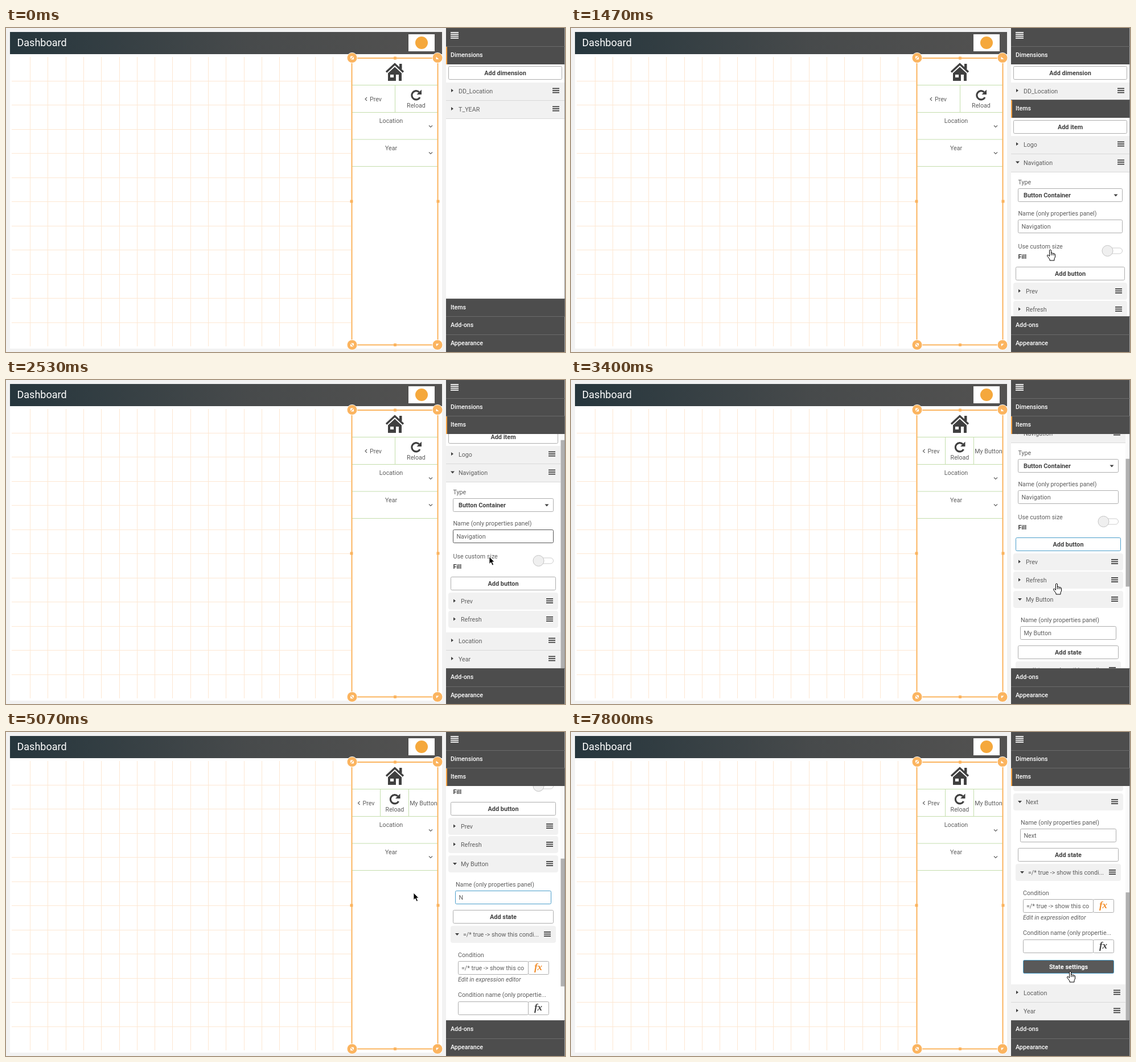
Recreate the animation shown at these times as an HTML page. Size 982x570 px, loop 8000 ms.

```html
<!DOCTYPE html>
<html lang="en">
<head>
<meta charset="utf-8">
<title>Dashboard</title>
<style>
  html, body { margin: 0; width: 100%; height: 100%; overflow: hidden; background: #f2f2f2; }
  svg { display: block; }
  text { font: 10.7px Roboto, sans-serif; white-space: pre; }
  .medium { font-weight: 500; }
  .bold { font-size: 10.9px; font-weight: 700; }
  .italic { font-style: italic; }
  .title { font-size: 18px; }
  .fx { font: italic 700 17px "Liberation Serif", serif; }
  .mid { text-anchor: middle; }
</style>
</head>
<body>
<svg id="stage" width="982" height="570" viewBox="0 0 982 570">
  <defs>
    <linearGradient id="bar">
      <stop stop-color="#26363d"/><stop offset=".55" stop-color="#474a4b"/><stop offset="1" stop-color="#535251"/>
    </linearGradient>
  </defs>
  <g id="sheet"></g>
  <g id="live"></g>
</svg>
<script>
const LOOP = 8000;
const DARK = '#4d4d4d', INK = '#404040', GREY = '#5e5e5e', LINE = '#adadad', ROW = '#f1f1f1';
const ORANGE = '#fbb45f', BLUE = '#4a9ecb', GREEN = '#c4deac';

// Drawing helpers
const rect = (x, y, w, h, fill, more = '') => `<rect x="${x}" y="${y}" width="${w}" height="${h}" fill="${fill}" ${more}/>`;
const path = (d, fill, more = '') => `<path d="${d}" fill="${fill}" ${more}/>`;
const stroke = (d, color, width = 1) => path(d, 'none', `stroke="${color}" stroke-width="${width}"`);
const text = (x, y, s, cls = '', fill = GREY) =>
  `<text x="${x}" y="${y + 3.8}" class="${cls}" fill="${fill}">${s.replace('>', '&gt;')}</text>`;
const field = (x, y, right, border = LINE, fill = '#fff') =>
  rect(x, y, right - x, 23, fill, `stroke="${border}" rx="2"`);
const button = (x, y, right, label, border, fill, ink = INK) =>
  field(x, y, right, border, fill) + text((x + right) / 2, y + 11.5, label, 'bold mid', ink);
const bars = (x, y, w, count, gap, color) =>
  Array.from({ length: count }, (_, i) => rect(x, y + i * gap, w, 1.8, color)).join('');
const fixed = (x, y, w, h, scroll, content) =>
  `<svg x="${x}" y="${y}" width="${w}" height="${h}" viewBox="${x} ${scroll} ${w} ${h}">${content}</svg>`;

// Timing helpers
const ramp = (t, a, b) => Math.min(1, Math.max(0, (t - a) / (b - a)));
const easeOut = p => 1 - (1 - p) ** 2;
const smooth = p => p * p * (3 - 2 * p);
const mix = (a, b, p) => `color-mix(in srgb, ${b} ${p * 100}%, ${a})`;

function drawSheet() {
  let grid = '';
  for (let i = 0; i < 18; i++) grid += `M${Math.round(42 + i * 31.3) + .5} 51V560`;
  for (let i = 0; i < 11; i++) grid += `M10 ${Math.round(93 + i * 42.45) + .5}H606`;
  return rect(0, 0, 982, 570, '#f2f2f2') + rect(7, 46, 759, 518, '#fff')
    + rect(7, 7, 759, 39, 'url(#bar)') + text(19.5, 28.6, 'Dashboard', 'title', '#fff')
    + rect(707, 11, 46, 30, '#fff') + '<circle cx="730" cy="26" r="11" fill="#f5a83c"/>'
    + stroke(grid, '#fde7d2') + rect(608, 53, 150, 504, '#fff');
}

const reload = x => `<g transform="translate(${x} 118)">`
  + stroke('M5.2-5.2A7.6 7.6 0 1 0 6.6 4', INK, 3.2) + path('M9.5-9.5V-1H1z', INK) + '</g>'
  + text(x, 136, 'Reload', 'mid');

function drawMenu(three) {
  const handle = (x, y, icon) => `<g transform="translate(${x} ${y})"><circle r="9" fill="${ORANGE}" stroke="#fff"/>${icon}</g>`;
  const knob = (x, y) => rect(x - 2.5, y - 2.5, 5, 5, ORANGE);
  const slash = d => rect(-3, -3, 6, 6, '#fff', 'rx="1"') + stroke(d, ORANGE, 1.3);
  const shift = three ? -12.5 : 0;
  return stroke('M668 77.5L683 63.5L698 77.5', INK, 3.4) + rect(691, 63, 4.5, 9, INK)
    + path('M671 79.5L683 68.5L695 79.5V93H671z', INK) + rect(675, 82, 6, 5, '#fff') + rect(685, 82, 5, 11, '#fff')
    + stroke('M608 100.5H758M608 148.5H758M608 196H758M608 243.5H758'
      + (three ? 'M657.5 100V148M707.5 100V148' : 'M683.5 100V148'), GREEN)
    + stroke(`M${634 + shift} 122l-3 3 3 3M743 171.5l3 3 3-3M743 218.5l3 3 3-3`, GREY, 1.1)
    + text(639 + shift, 125, 'Prev') + reload(three ? 683 : 720.5)
    + (three ? text(733.5, 125, 'My Button', 'mid') : '')
    + text(676.5, 163.5, 'Location', 'mid') + text(676.5, 211, 'Year', 'mid')
    + rect(607.5, 53, 151, 504.5, 'none', `stroke="${ORANGE}" stroke-width="2"`)
    + knob(683.5, 53) + knob(607, 305) + knob(759, 305) + knob(683.5, 557.5)
    + handle(608, 52.5, slash('M-3 3L3-3')) + handle(758, 52.5, path('M-2.5-2V2.5H2.5z', '#fff'))
    + handle(608, 557.5, slash('M-3-3L3 3')) + handle(758, 557.5, path('M-2.5-2H2.5L-2 2.5z', '#fff'));
}

// One list row; each nesting level is inset by 4 px on both sides.
function row(y, label, right, open = false, level = 0) {
  const inset = 4 * level, x = 773 + inset, w = right + 4 - inset - x, mid = y + (level ? 15.5 : 15);
  return (level ? rect(x, y, w, 30, ROW, 'rx="4"') : rect(x, y, w, 31, ROW) + rect(x, y + 31, w, 1, '#d9d9d9'))
    + path(open ? `M${x + 8} ${mid - 2.5}h7l-3.5 4z` : `M${x + 9} ${mid - 4}v6l4-3z`, INK)
    + text(x + 22, mid, label) + bars(right - 17 - inset, mid - 5.5, 12, 3, 3.6, INK);
}

const header = (y, label, active) => rect(773, y, 208.5, 32, DARK) + rect(773, y, 208.5, 1, '#6a6a6a')
  + (active ? rect(773, y + 1, 2, 31, '#f5a040') : '') + text(781, y + 15.6, label, 'medium', '#fff');

function typedName(t) {
  if (t < 5070) return 'My Button';
  return 'Next'.slice(0, [5070, 5330, 5600, 5670].filter(k => k <= t).length);
}

function buttonEditor(t, right) {
  const focus = ramp(t, 4090, 4140) - ramp(t, 6180, 6330);
  const select = t < 5070 ? ramp(t, 4240, 4400) : 0;
  const caret = t > 5070 && t < 6200 ? '<tspan dx="-1" font-weight="100">|</tspan>' : '';
  const pressed = ramp(t, 7620, 7800);
  const formula = (y, value, ink) => field(794.5, y, 917.5) + field(917.5, y, right - 16.5)
    + text(800, y + 11.5, value) + text(935, y + 12, 'fx', 'fx mid', ink);
  return row(356, t < 6250 ? 'My Button' : 'Next', right, true, 1)
    + text(790, 407, 'Name (only properties panel)')
    + field(789.5, 418.5, right - 12.5, mix(LINE, BLUE, focus))
    + rect(846 - 50 * select, 423, 50 * select, 15, '#3390ff')
    + text(795.5, 430, typedName(t) + caret, '', select > .5 ? '#fff' : GREY)
    + button(785.5, 452.5, right - 8.5, 'Add state')
    + row(480, '=/* true -> show this condi...', right, true, 2)
    + text(794, 531, 'Condition') + formula(542.5, '=/* true -> show this co', '#f28c28')
    + text(794, 574.5, 'Edit in expression editor', 'italic')
    + text(794, 601.5, 'Condition name (only propertie...') + formula(613.5, '', INK)
    + button(794.5, 649.5, right - 16.5, 'State settings', mix(LINE, BLUE, pressed),
      mix('#fff', '#595959', pressed), mix(INK, '#fff', pressed));
}

function itemsBody(t, right, expanded) {
  const hover = ramp(t, 2200, 2300) - ramp(t, 2560, 2680);
  const focus = ramp(t, 2820, 2940) - ramp(t, 4130, 4300);
  const tail = expanded ? 692 : 360;
  return button(777.5, 4.5, right - .5, 'Add item')
    + row(32, 'Logo', right) + row(64, 'Navigation', right, true)
    + text(785.5, 113.5, 'Type') + field(785.5, 124.5, right - 8.5)
    + text(795, 136, 'Button Container', 'bold', INK) + path(`M${right - 23.5} 134.5h7l-3.5 4z`, INK)
    + text(785.5, 168.5, 'Name (only properties panel)')
    + field(785.5, 179.5, right - 8.5, mix(LINE, '#555', hover)) + text(791.5, 191.5, 'Navigation')
    + text(785.5, 226, 'Use custom size') + text(785.5, 244.5, 'Fill', 'bold', INK)
    + rect(right - 38, 229, 29.5, 10, '#fff', 'rx="5" stroke="#ccc"')
    + `<circle cx="${right - 34.5}" cy="234" r="9.5" fill="#efefef" stroke="#c4c4c4"/>`
    + button(781.5, 262.5, right - 4.5, 'Add button', mix(LINE, BLUE, focus))
    + row(290, 'Prev', right, false, 1) + row(322, 'Refresh', right, false, 1)
    + (expanded ? buttonEditor(t, right) : '')
    + row(tail, 'Location', right) + row(tail + 32, 'Year', right);
}

// Wheel steps: start, end, distance
const WHEEL = [[2000, 2150, 11], [3324, 3524, 111], [3540, 3740, 112], [7150, 7350, 109]];
const scrollAt = t => WHEEL.reduce((sum, [a, b, d]) => sum + d * easeOut(ramp(t, a, b)), 0);

function drawPanel(t) {
  const slide = easeOut(ramp(t, 1130, 1690)), top = Math.round(476 - 413 * slide);
  const barShown = slide === 1, expanded = t >= 3070;
  const right = barShown ? 970 : 977, total = expanded ? 755 : 423;
  const bodyHeight = 507 - top - 32, scroll = Math.round(scrollAt(t));
  const dims = button(777.5, 3.5, 976.5, 'Add dimension') + row(32, 'DD_Location', 977) + row(64, 'T_YEAR', 977);
  const thumb = rect(974, 95, 7, 412, '#fafafa') + rect(974.5, 95 + scroll * 412 / total, 6.5, 412 * 412 / total, '#b0b0b0');
  return rect(773, 0, 208.5, 570, '#fff') + rect(773, 0, 208.5, 33, DARK) + bars(781, 7, 14, 4, 3.3, '#fff')
    + header(32, 'Dimensions', t < 1130)
    + (top > 64 ? fixed(773, 64, 208, top - 64, 0, dims) : '')
    + header(top, 'Items', t >= 1130)
    + (bodyHeight > 0 ? fixed(773, top + 32, 208, bodyHeight, scroll, itemsBody(t, right, expanded)) : '')
    + (barShown ? thumb : '') + rect(981, 64, .6, 444, '#555')
    + header(507, 'Add-ons') + header(539, 'Appearance');
}

const POINTERS = {
  arrow: path('M0 0V12.5L3 9.8L5.2 15L7.5 14L5.3 9H9z', '#000', 'stroke="#fff" stroke-width=".8"'),
  hand: path('M-1.5 1Q0-1 1.5 1V6L3 5.6 4.5 6.5 6.5 6.6 8.5 8V13L7 16V19H-1V17L-5.5 11Q-5.5 8.5-3.5 9.5L-1.5 11.5z', '#fff', 'stroke="#000"')
    + stroke('M1.5 6V10M4 7V10M6.3 7.5V10', '#000', .9),
  beam: stroke('M-2.5-7.5H2.5M0-7.5V7.5M-2.5 7.5H2.5', '#222')
};
// Pointer path: time, x, y, shape from that time on
const TRACK = [
  [470, 945, 484, 'hand'], [870, 808, 485, 'hand'], [1130, 808, 485, 'hand'], [1470, 842, 390, 'hand'],
  [1930, 845, 300, 'arrow'], [2350, 848, 280, 'arrow'], [2530, 849, 311, 'arrow'], [2800, 853, 358, 'hand'],
  [3600, 853, 358, 'hand'], [3780, 850, 322, 'beam'], [4060, 846, 291, 'beam'], [4200, 846, 291, 'beam'],
  [4400, 716, 283, 'arrow'], [6735, 716, 283, 'arrow'], [6800, 774, 295, 'arrow'], [7200, 868, 385, 'arrow'],
  [7580, 877, 421, 'hand'], [LOOP, 877, 421, 'hand']
];
function drawPointer(t) {
  if (t < TRACK[0][0]) return '';
  const i = TRACK.findIndex(k => k[0] > t), [t0, x0, y0, shape] = TRACK[i - 1], [t1, x1, y1] = TRACK[i];
  const p = smooth(ramp(t, t0, t1));
  return `<g transform="translate(${x0 + (x1 - x0) * p} ${y0 + (y1 - y0) * p})">${POINTERS[shape]}</g>`;
}

const live = document.getElementById('live');
let shown = '';
function frame() {
  const t = performance.now() % LOOP;
  const markup = drawMenu(t >= 3270) + drawPanel(t) + drawPointer(t);
  if (markup !== shown) live.innerHTML = shown = markup;
  requestAnimationFrame(frame);
}
document.getElementById('sheet').innerHTML = drawSheet();
frame();
</script>
</body>
</html>
```
